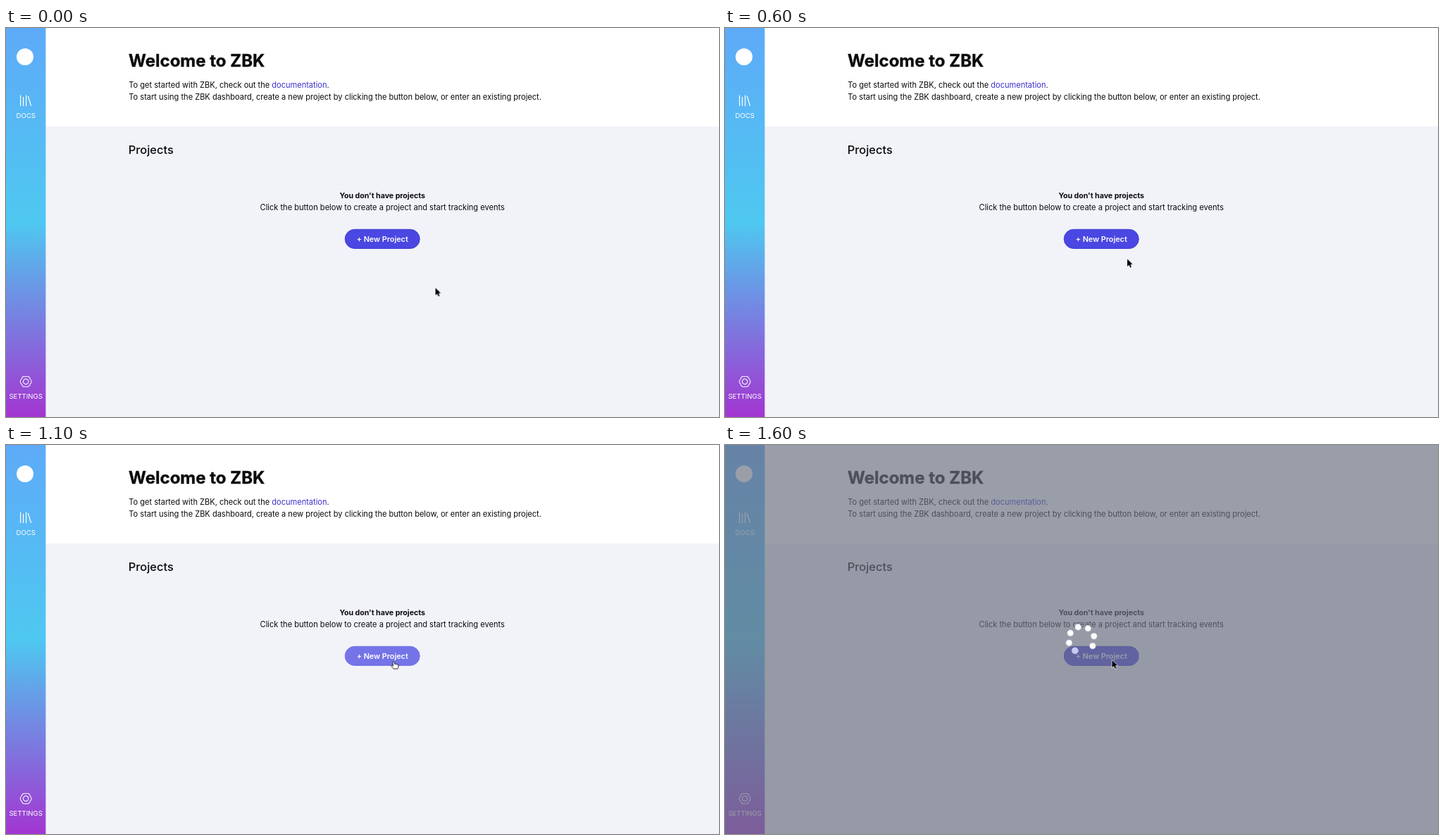
An HTML page that plays this animation: 1012 by 553 pixels, repeating every 1.7 s.

```html
<!DOCTYPE html>
<html lang="en">
<head>
<meta charset="utf-8">
<title>Dashboard</title>
<style>
  html, body { margin: 0; width: 100%; height: 100%; overflow: hidden; background: #fff; }
  svg { display: block; width: 1012px; height: 553px; }
  text { font-family: Inter, "Liberation Sans", sans-serif; font-optical-sizing: none; fill: #0b0b0d; }

  .title { font-size: 24px; font-weight: 700; stroke: #0b0b0d; stroke-width: .35px; }
  .body { font-size: 11.05px; }
  .heading { font-size: 16.4px; font-weight: 500; }
  .empty { font-size: 10.6px; font-weight: 700; }
  .link { fill: #3b30cc; }
  .mid { text-anchor: middle; }
  .nav { font-size: 9.6px; fill: #fff; }
  .label { font-size: 10.8px; font-weight: 600; fill: #fff; }
  .icon { fill: none; stroke: #fff; stroke-width: 1.2px; }

  .button, .dim, .arrow, .hand, .pointer, .spin {
    animation: 1.7s step-end infinite;
  }
  .button { fill: #4a47e2; stroke: #403dcf; animation-name: hover; }
  .dim { animation-name: show-dim; }
  .arrow { animation-name: show-arrow; }
  .hand { animation-name: show-hand; }
  .pointer { animation-name: move; }
  .spin { transform-origin: 506px 276.5px; animation-name: spin; }

  @keyframes hover {
    0% { fill: #4a47e2; stroke: #403dcf; }
    47.05% { fill: #7573e8; stroke: #7573e8; }
    76.47%, 100% { fill: #4a47e2; stroke: #403dcf; }
  }
  @keyframes show-dim {
    0% { visibility: hidden; }
    76.47%, 100% { visibility: visible; }
  }
  @keyframes show-arrow {
    0% { visibility: visible; }
    47.05% { visibility: hidden; }
    76.47%, 100% { visibility: visible; }
  }
  @keyframes show-hand {
    0% { visibility: hidden; }
    47.05% { visibility: visible; }
    76.47%, 100% { visibility: hidden; }
  }
  @keyframes move {
    0% { transform: translate(609.5px, 369.5px); }
    23.52% { transform: translate(602px, 362px); }
    29.41% { transform: translate(586px, 345px); }
    35.29% { transform: translate(571px, 328.5px); }
    41.17% { transform: translate(561px, 318.5px); }
    47.05% { transform: translate(554.5px, 313.5px); }
    52.94% { transform: translate(552px, 310.5px); }
    58.82% { transform: translate(550.5px, 308.5px); }
    64.7% { transform: translate(550px, 307.5px); }
    76.47%, 100% { transform: translate(549.5px, 306px); }
  }
  @keyframes spin {
    0%, 76.47% { transform: rotate(38deg); }
    82.35% { transform: rotate(72deg); }
    88.23% { transform: rotate(106deg); }
    94.11%, 100% { transform: rotate(140deg); }
  }
</style>
</head>
<body>
<svg viewBox="0 0 1012 553">
  <defs>
    <linearGradient id="side" x2="0" y2="1">
      <stop offset="0" stop-color="#5eaaf8"/>
      <stop offset=".5" stop-color="#4ec8f0"/>
      <stop offset="1" stop-color="#a336d1"/>
    </linearGradient>
    <clipPath id="low"><rect x="480" y="289" width="110" height="25"/></clipPath>
    <!-- Seven round dots, one place in eight left empty -->
    <circle id="dots" cx="506" cy="276.5" r="18.3" fill="none" pathLength="360"
      stroke-width="8.8" stroke-linecap="round" stroke-dashoffset="20"
      stroke-dasharray=".01 44.99 .01 44.99 .01 44.99 .01 44.99 .01 44.99 .01 44.99 .01 89.99"/>
  </defs>

  <rect width="1012" height="553" fill="#fff"/>
  <rect x="56" y="140" width="956" height="413" fill="#f2f3f9"/>

  <rect width="56.4" height="553" fill="url(#side)"/>
  <circle cx="27" cy="41" r="12" fill="#fff"/>
  <path class="icon" d="M20.6 95.5V111M24.6 98V111M28.6 95.5V111M31.3 97L35.6 110.8"/>
  <text class="nav mid" x="28.2" y="128">DOCS</text>
  <g class="icon" transform="translate(28.2 502.6) rotate(30)" style="stroke-width:1px">
    <path d="M7 0A4.2 4.2 0 0 1 3.5 6.06A4.2 4.2 0 0 1-3.5 6.06A4.2 4.2 0 0 1-7 0A4.2 4.2 0 0 1-3.5-6.06A4.2 4.2 0 0 1 3.5-6.06A4.2 4.2 0 0 1 7 0Z"/>
    <circle r="3.6"/>
  </g>
  <text class="nav mid" x="28.2" y="527">SETTINGS</text>

  <text class="title" x="174" y="55">Welcome to ZBK</text>
  <text class="body" x="174.3" y="85">To get started with ZBK, check out the <tspan class="link">documentation</tspan>.</text>
  <text class="body" x="174.3" y="102">To start using the ZBK dashboard, create a new project by clicking the button below, or enter an existing project.</text>

  <text class="heading" x="173.8" y="178.5">Projects</text>
  <text class="empty mid" x="534.2" y="241.7">You don't have projects</text>
  <text class="body mid" x="534.2" y="258.8">Click the button below to create a project and start tracking events</text>
  <rect class="button" x="481.2" y="286.3" width="106" height="27.2" rx="13.6"/>
  <text class="label mid" x="534.2" y="303.6">+ New Project</text>

  <g class="dim">
    <rect width="1012" height="553" fill="#6b7080" fill-opacity=".68"/>
    <g class="spin" stroke="#fff"><use href="#dots"/></g>
    <g clip-path="url(#low)"><g class="spin" stroke="#c6c8f6"><use href="#dots"/></g></g>
  </g>

  <g class="pointer">
    <path class="arrow" d="M0 0V10.6L2.5 8.3L4.2 12.1L6 11.3L4.4 7.6H7.7Z"
      fill="#000" stroke="#fff" stroke-width="1.2" paint-order="stroke" stroke-linejoin="round"/>
    <path class="hand" d="M-1.2 1.2Q0-.6 1.2 1.2L1.7 4Q3 3.3 3.7 4.3Q5 3.8 5.5 4.8Q7 4.4 7 6V8Q6.5 9.5 6 10.6H0Q-1 9-3.4 6.6Q-3 5-.4 6.5Z"
      fill="#fff" stroke="#111" stroke-width=".9" stroke-linejoin="round"/>
  </g>
</svg>
</body>
</html>
```
